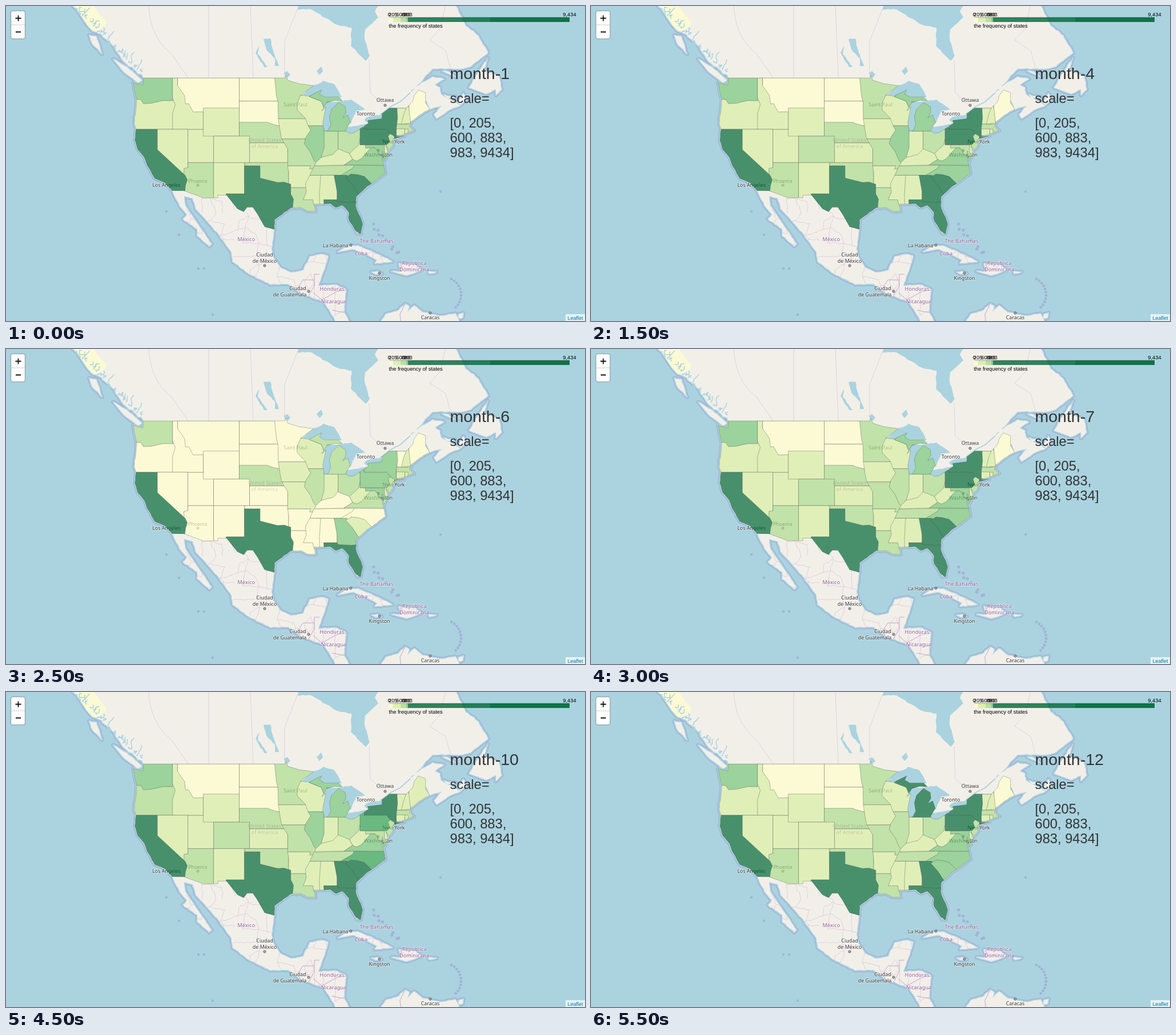
These frames come from a looping animation (1014 px wide and 552 px high, 6 s). An HTML page:

```html
<!DOCTYPE html>
<html lang="en">
<head>
<meta charset="utf-8">
<title>State frequency by month</title>
<style>
html, body { margin: 0; width: 100%; height: 100%; overflow: hidden; background: #aad3df; }
svg { display: block; width: 1014px; height: 552px; }
.city { font: 8.9px "Noto Sans", sans-serif; fill: #333; }
.country { font: 9px "Noto Sans", sans-serif; fill: #8f5a99; letter-spacing: .15px; }
.city, .country { text-anchor: middle; paint-order: stroke; stroke: #fff; stroke-opacity: .55; stroke-width: 1.6px; }
.small { font: 9.3px "Liberation Sans", Arial, sans-serif; }
.big { font: 23.7px "Liberation Sans", Arial, sans-serif; fill: #333; }
#month { font-size: 28.5px; }
</style>
</head>
<body>
<svg id="stage" viewBox="0 0 1014 552" xmlns="http://www.w3.org/2000/svg"></svg>
<script>
const sea = "#aad3df", ground = "#f2efe9", shelf = "#a4b2d7";
const ramp = ["#ffffcc", "#d9f0a3", "#addd8e", "#78c679", "#31a354", "#006837"];

// States as degrees west and north; four numbers make a box. Later states
// cover earlier ones, so each border is written once; the coast clips the rest.
const states = {
  WA: "125.5 49.5 117.03 45.5",
  OR: "125 46.25 123.2 46.15 122.7 45.6 121.2 45.65 119 46 116.4 46 116.4 42 125 42",
  MT: "116.05 49 104.05 44.4",
  UT: "114.04 42 109.05 37",
  WY: "111.05 45 104.05 41",
  ID: "117.03 49 116.05 49 116.05 48 114.7 46.7 114.5 45.56 113.9 45.6 113 44.45 111.05 44.48 111.05 42 117.03 42 117.03 44.2 116.5 45.5 117.03 46.4",
  NV: "120 42 114.04 35",
  NM: "109.05 37 103 31.3",
  AZ: "114.04 37 109.05 37 109.05 31 114.8 31 114.8 36.1 114.04 36.2",
  CA: "125 42 120 42 120 39 114.6 35 114.15 34.27 114.5 33.4 114.7 32 125 32",
  ND: "104.05 49 96 45.94",
  SD: "104.05 45.94 96 42.5",
  NE: "104.05 43 98.5 43 97.9 42.8 96.4 42.5 95 42.5 95 40 104.05 40",
  CO: "109.05 41 102.05 37",
  KS: "102.05 40 94.61 37",
  OK: "103 37 94.43 33.6",
  MN: "97.23 49.5 89 49.5 89 43.5 96.45 43.5 96.5 45.9 96.8 46.6",
  IA: "96.45 43.5 90 43.5 90 40.6 95.8 40.58 96.1 41.8",
  AR: "94.62 36.5 89 36.5 89 33 94.04 33 94.04 33.6 94.45 33.6 94.43 35.4",
  LA: "94.04 33 88.8 28",
  MO: "95.77 40.58 89 40.58 89 36 90.37 36 90.15 36.5 94.62 36.5 94.61 39.1",
  TX: "103.04 36.5 100 36.5 100 34.56 96.6 33.85 95.3 33.9 94.04 33.55 94.04 32 93.5 31.1 93.75 29 96 25 106.6 28 106.6 32 103.04 32",
  MS: "91.1 33 91 32.3 91.6 31 89.75 31 89.5 30 88 30 88 35 90.3 35 91.15 33.7",
  AL: "88.2 35 85 35 85 31 87.6 31 87.5 30 88.4 30 88.45 31.9",
  WI: "92.1 46.7 90.8 47 90.4 46.55 88.1 45.92 87.6 45.1 86.9 45.2 87.5 42.5 90.65 42.5 91.2 43.6 92.75 44.75 92.85 45.6",
  IN: "88.1 41.75 84.81 37.7",
  IL: "90.65 42.5 87.53 42.5 87.53 39.3 88.1 37.8 89 36.9 89.5 37.3 90.2 38.6 91.4 39.9 91.1 40.8 90.15 41.9",
  VA: "83.7 36.58 75 36.55 75 39.4 78.5 39.4 80.3 38 82 37.5",
  OH: "84.82 42 80.52 38.3",
  WV: "82.6 38.4 82 37.5 81.2 37.25 80.3 37.6 78.3 39.4 77.75 39.3 77.75 39.72 80.52 39.72 80.52 40.6 80.8 39.7",
  TN: "90.3 35 81.68 35 81.68 36.6 89.5 36.5",
  NC: "84.3 35 78.5 33 75 34 75 36.55 81.68 36.59 82 36.1",
  GA: "85.6 35 83.1 35 80 32 80 30.3 85 30.5 85 32.3",
  SC: "83.35 34.7 82.3 35.2 81 35.1 79.7 34.8 78 33.4 80 31.5 80.9 32.05 82 33.45",
  FL: "87.6 31 85 31 84.86 30.7 82.2 30.57 81 30.7 79 24 87.5 30",
  KY: "89.4 36.5 83.7 36.6 82 37.5 82.6 38.4 84.8 39.1 85.8 38.25 88.1 37.8 89.15 36.98",
  ME: "71.05 47.5 66.9 43",
  VT: "73.4 45 71.5 42.74",
  MA: "73.5 42.74 69.5 41",
  CT: "73.5 42.05 71.83 41",
  RI: "71.83 42.02 71.2 41",
  NH: "71.5 45.1 71.08 45.3 70.7 42.87 72.5 42.73 72.05 44.1",
  NY: "79.76 42 79.76 43.5 74.7 45.1 73.35 45 73.25 43.6 73.5 42.05 73.5 41.05 71.7 41.1 71.7 40.8 74 40.4 74.7 41.35",
  MD: "79.48 39.72 75 39.72 75 38 76.3 38 77 38.35 77.05 38.85 77.75 39.3 79.48 39.2",
  PA: "80.52 42.3 79.76 42.3 79.76 42 75.35 42 74.6 41.3 74.7 39.72 80.52 39.72",
  DE: "75.79 39.72 75 38.45",
  NJ: "74.7 41.35 73.9 41 73.5 40 74.9 38.5 75.5 39.6 74.75 40.2 75.1 40.95",
  MI: "87 45.85 82 41.72/90.4 46.55 88 48 83.5 46.4 84 45.9 87 45.5 87.6 45.1 88.1 45.92"
};

const north = "122.8 48.1 122.75 49 95.15 49 95 49.35 94.6 48.7 92.4 48.25 89.6 48 92.1 46.75 90.5 46.6 88 47.45 88.4 46.9 87.4 46.5 84.7 46.5 84 46 85.5 46.05 87 45.75 88 44.6 87.2 45.1 87.8 43 87.5 41.7 86.8 41.8 86.25 42.6 86.5 43.8 86.1 44.8 84.75 45.77 83.4 45.2 83.3 44.4 83.9 43.65 82.95 44.05 82.45 43 83.4 41.8 82.6 41.4 81.7 41.5 78.9 42.85 79.05 43.27 76.3 43.5 76.3 44.2 74.8 45 71.5 45 70.3 45.9 70 46.7 69.2 47.45 67.8 47.07 67.8 45.7";
const atlantic = "67 44.85 69 44 70.6 43.1 70.9 42.4 70 41.8 71.2 41.5 73.7 40.9 74.2 40.5 74.1 39.7 74.9 38.95 75.5 39.5 75.05 38.45 75.9 37.2 76.2 38.8 76.4 38 76 36.9 75.6 35.3 77.9 33.9 79.2 33.2 81.3 31.5 81.4 30 80.05 26.9 80.4 25.2";
const gulf = "81.1 25.2 82.7 27.6 82.7 28.9 84 30.1 85.3 29.7 86.3 30.4 89.4 30.3 89.2 29.05 90.8 29.1 91.8 29.6 93.85 29.7 95.3 28.9 97.2 27.6 97.2 25.95";
const south = "99.1 26.4 100.5 28.6 101.4 29.77 102.5 29.75 103.2 29 104.4 29.5 106.5 31.78 108.2 31.78 108.2 31.33 111.07 31.33 114.8 32.5";
const pacific = "117.12 32.53 118.4 33.75 120.5 34.5 121.9 36.5 122.5 37.8 123.8 39 124.35 40.4 124.1 42 124.5 42.8 124 46.2 124.7 48.4";

// Other land and water, in stage pixels.
const panhandle = "118 -8 128 12 142 33 150 42 161 44 173 35 176 28 161 11 150 -8";
const fjordCoast = "110 -10 128 12 152 44 168 50 190 72 206 97 238 120";
const canada = "241 127 262 200 600 228 680 200 736 166 742 181 764 175 750 190 754 197 773 184 796 174 762 155 760 143 751 138 767 128 747 124 724 138 708 152 720 139 747 110 796 110 814 106 844 82 827 52 805 35 788 0 788 -10";
const mexico = "291 323 304 350 317 365 310 373 335 391 335 403 356 421 360 417 342 391 314 350 312 333 327 337 332 355 373 401 395 432 397 448 425 469 463 488 494 487 515 503 557 519 574 545 580 560 606 560 592 537 596 498 580 489 547 490 556 465 564 438 553 435 532 439 521 463 499 467 480 458 468 440 465 425 470 391 440 340 312 318";
const cuba = "581 431 598 421 616 420 652 435 677 448 646 451 650 445 640 440 620 430 607 426";
const hispaniola = "675 465 693 465 688 451 716 453 729 463 701 472";
const islands = [cuba, hispaniola,
  "188 93 212 107 238 130 231 134 205 114",
  "146 51 158 53 168 84 150 64",
  "811 143 820 126 844 91 836 112 863 123 868 146 858 156 858 146 841 154",
  "791 170 801 153 806 165 797 173",
  "767 155 774 158 787 159 772 162",
  "764 114 775 115 789 125",
  "640 466 650 465 658 469 648 470",
  "740 465 754 466 741 469",
  "793 540 801 538 800 546 792 547",
  "650 562 665 540 688 533 699 522 706 526 703 536 715 525 730 537 764 543 787 539 798 562"];
const water = [
  "514 -9 510 6 535 6 580 33 605 38 604 70 630 96 637 87 628 58 629 41 652 20 646 10 656 -9",
  "516 157 535 142 556 131 575 137 588 160",
  "553 168 582 168 582 222 553 222",
  "580 168 605 164 629 181 613 184 604 206 585 206",
  "590 224 598 212 638 205 638 222",
  "627 200 632 195 657 190 660 203 632 204",
  "451 58 463 57 469 82 478 105 471 105 471 92 456 76",
  "443 70 441 84 458 107 452 107 437 82",
  "544 114 552 106 555 114 549 121",
  "486 117 492 114 498 120 493 126"];

let seed = 7;
function random() {
  seed = (seed * 16807) % 2147483647;
  return seed / 2147483647;
}
const jitter = size => (random() - .5) * 2 * size;

function pairs(text) {
  const n = text.split(" ").map(Number);
  return n.flatMap((v, i) => i % 2 ? [] : [[v, n[i + 1]]]);
}
function project([west, lat]) {
  const merc = Math.log(Math.tan(Math.PI / 4 + lat * Math.PI / 360));
  return [1344.9 - 9 * west, 633.3 - 515.7 * merc];
}
const geo = text => pairs(text).map(project);
// Breaks a line into short steps and shakes the points between its keys.
function rough(points, size) {
  return points.flatMap((p, i) => {
    const q = points[i + 1];
    if (!q) return [p];
    const n = Math.ceil(Math.hypot(q[0] - p[0], q[1] - p[1]) / 6);
    return Array.from({ length: n }, (_, k) => [0, 1].map(a =>
      p[a] + (q[a] - p[a]) * k / n + (k ? jitter(size) : 0)));
  });
}
const line = points => "M" + points.map(p => p.map(v => v.toFixed(1)).join(" ")).join("L");
const ring = points => line(points) + "z";
function stateShape(text) {
  return text.split("/").map(part => {
    const p = pairs(part), [a, b] = p;
    return ring((p.length === 2 ? [a, [b[0], a[1]], b, [a[0], b[1]]] : p).map(project));
  }).join("");
}

const path = (d, attrs = "") => `<path d="${d}" ${attrs}/>`;
const group = (attrs, body) => `<g ${attrs}>${body}</g>`;
const rect = (x, y, w, h, attrs) => `<rect x="${x}" y="${y}" width="${w}" height="${h}" ${attrs}/>`;
const dot = (x, y, r) => `<circle cx="${x}" cy="${y}" r="${r}"/>`;
const text = (x, y, s, attrs) => `<text x="${x}" y="${y}" ${attrs}>${s}</text>`;
const labels = (cls, list) => list.map(([x, y, s]) => text(x, y, s, `class="${cls}"`)).join("");

const longIsland = ring(geo("74 40.6 73.7 40.88 72.5 40.97 71.9 41.05"));
const usa = ring([...geo(north), ...rough(geo(atlantic), .7), ...rough(geo(gulf), .7),
  ...geo(south), ...rough(geo(pacific), .7)]) + longIsland;
const mexicoShape = ring(rough(pairs(mexico), .8));
const coast = [ring([...rough(pairs(fjordCoast), 2.5), ...rough(pairs(canada), 1)]), mexicoShape,
  ring(pairs(panhandle)), ...islands.map(s => ring(rough(pairs(s), .8))), usa].join("");

function fjords() {
  let d = "";
  for (let i = 0; i < 30; i++) {
    const t = i / 29, p = [[122 + 112 * t + jitter(3), 118 * t ** .9 - 2]];
    for (let k = 0; k < 4; k++) p.push([p[k][0] + 1 + jitter(4), p[k][1] - 2 + jitter(5)]);
    d += line(p);
  }
  return d;
}
// A loose net of province lines, cut to the land it lies on.
function net() {
  const step = 20, at = {};
  let d = "";
  for (let y = 335; y < 545; y += step) for (let x = 320; x < 740; x += step) {
    const p = at[x + "," + y] = [x + jitter(8), y + jitter(8)];
    for (const q of [at[x - step + "," + y], at[x + "," + (y - step)]])
      if (q && random() < .6) d += line(rough([q, p], 1.5));
  }
  return d;
}
function islets() {
  let out = [[761, 325], [281, 360], [303, 401], [347, 460], [337, 460], [362, 541]].map(p => dot(...p, 2.2)).join("");
  for (let i = 0; i < 11; i++) {
    const a = -1.1 + i * .19;
    out += dot(766 + 31 * Math.cos(a), 506 + 31 * Math.sin(a), 2.4);
    out += dot(640 + 4.8 * i + jitter(5), 384 + 5 * i + jitter(3), 2.6);
  }
  return out;
}

const provinces = "M250-2Q252 55 290 84L319 126M355-2V126M428-2L433 126M510 6L488 62V124M636 95L638 152 666 178M770-2L760 40 742 60 770 78 778 108";
const nations = "M515 503L512 492 520 480 540 480V470H549M540 480V490L530 508M538 502L553 515 580 500 596 498M571 533L592 537M692 465V451M699 522L690 540 692 560";
const townDots = [[664, 174], [453, 455], [530, 500], [604, 419], [654, 468], [743, 538], [652, 253], [336, 314]];
const cities = [[664, 168, "Ottawa"], [630, 192, "Toronto"], [507, 176, "Saint Paul"], [679, 241, "New York"],
  [652, 264, "Washington"], [281, 317, "Los Angeles"], [336, 310, "Phoenix"], [453, 439, "Ciudad"], [453, 450, "de México"],
  [511, 498, "Ciudad"], [497, 508.5, "de Guatemala"], [577, 422.5, "La Habana"], [654, 480, "Kingston"], [743, 549, "Caracas"]];
const countries = [[453, 238, "United States"], [453, 248.5, "of America"], [421, 411.5, "México"], [649, 415, "The Bahamas"],
  [622, 437, "Cuba"], [715, 454, "República"], [715, 464.5, "Dominicana"], [571, 499, "Honduras"], [574, 520.5, "Nicaragua"]];

const legendX = v => 671 + v * 316 / 9434;
const stops = [0, 205, 600, 883, 983, 9434];
const legend = stops.slice(1).map((v, i) => {
  const x = legendX(stops[i]);
  return rect(x, 20, legendX(v) - x, 8, `fill="${ramp[i < 4 ? i : 5]}" fill-opacity=".8"`);
}).join("") + rect(848, 20, 139, 8, 'fill="#006837" fill-opacity=".5"')
  + path("M671 20H987", 'stroke="#234" stroke-opacity=".45"')
  + stops.map(v => text(legendX(v), 18, v.toLocaleString("en-US"), 'class="small" text-anchor="middle"')).join("")
  + text(670.5, 37.5, "the frequency of states", 'class="small"');

const zoom = rect(8.5, 8.5, 25, 49, 'rx="3.5" fill="#fff" stroke="#000" stroke-opacity=".25" stroke-width="1.6"')
  + path("M9 33H33", 'stroke="#ccc"') + path("M16.5 21.5H26.5M21.5 16.5V26.5M17 45.5H26", 'stroke="#111" stroke-width="1.8"');

const stage = document.getElementById("stage");
stage.innerHTML = `<defs><clipPath id="us">${path(usa)}</clipPath><clipPath id="latin">`
  + path(mexicoShape + ring(pairs(cuba)) + ring(pairs(hispaniola))) + "</clipPath></defs>"
  + rect(0, 0, 1014, 552, `fill="${sea}"`)
  + path(coast, `fill="none" stroke="${shelf}" stroke-width="7" stroke-linejoin="round"`)
  + path(coast, `fill="none" stroke="${sea}" stroke-width="3.8" stroke-linejoin="round"`)
  + group(`fill="${shelf}"`, islets())
  + path(coast, `fill="${ground}"`)
  + path(water.map(s => ring(rough(pairs(s), .8))).join(""), `fill="${sea}"`)
  + path("M708 152L690 168 674 176 656 190", `fill="none" stroke="${sea}" stroke-width="1.8"`)
  + path(usa, `fill="${ground}"`)
  + path(net(), 'clip-path="url(#latin)" fill="none" stroke="#dcc6dc" stroke-width=".8"')
  + path(provinces, 'fill="none" stroke="#dccbdd" stroke-width=".8"')
  + path(nations, 'fill="none" stroke="#c5a3cd"')
  + group('fill="#aaa" stroke="#555" stroke-width=".9"', townDots.map(p => dot(...p, 2.1)).join(""))
  + labels("city", cities) + labels("country", countries)
  + group('clip-path="url(#us)" opacity=".7" stroke="#000" stroke-opacity=".42" stroke-width=".9" stroke-linejoin="round"',
    Object.entries(states).map(([id, s]) => path(stateShape(s), `id="${id}"`)).join(""))
  + path(usa, 'fill="none" stroke="#000" stroke-opacity=".27" stroke-width=".8"')
  + path(ring(pairs(panhandle)), `fill="${ramp[0]}" fill-opacity=".7"`)
  + path(fjords(), `fill="none" stroke="${sea}" stroke-width="1.5"`)
  + legend
  + text(777.5, 128.3, "", 'id="month" class="big"')
  + ["scale=", "[0, 205,", "600, 883,", "983, 9434]"]
    .map((s, i) => text(777.5, i ? 186.4 + 26.1 * i : 170.4, s, 'class="big"')).join("")
  + zoom + rect(980, 540, 34, 12, 'fill="#fff" fill-opacity=".7"')
  + text(983.5, 549.5, "Leaflet", 'class="small" style="font-size:9px" fill="#0078a8"');

// States listed by level 0 to 5, then what each month changes.
const levels = ["MT ND SD ME", "OR NV ID WY UT NM KS IA AR MS AL KY WV DE CT RI VT NH WI IN",
  "CO AZ NE OK MN MO LA TN NJ MA OH", "WA NC VA MD MI IL", "", "CA TX GA FL SC PA NY"];
const changes = ["CO1 IN2", "CO1", "ME1 MD4 NJ3", "MD2", "NY4 PA2 GA4 NC4 IL2 MD2",
  "WA2 CA5 TX5 FL5 GA3 SC1 NY3 PA3 NJ2 MA2 VA2 MD3 WV1 OH2 IN1 MI2 WI1 IL2 MO1 IA1 NE2 NH1 CT1 RI1 DE1",
  "IL2", "OR2 ND1 IL2 IN2 VA5 NC5 MD5", "OR2 NC4", "OR2 PA4 NC4 ME1 MD2", "PA4", "CO1 MI5 SC3 IL2"];
const quietMonth = 5;

function levelOf(id, m) {
  const change = changes[m].split(" ").find(c => c.startsWith(id));
  if (change) return +change[2];
  return m === quietMonth ? 0 : levels.findIndex(s => s.includes(id));
}

const title = document.getElementById("month");
let shown = -1;
function draw(ms) {
  const m = Math.floor(ms / 500) % 12;
  if (m === shown) return;
  shown = m;
  title.textContent = "month-" + (m + 1);
  for (const id in states) document.getElementById(id).setAttribute("fill", ramp[levelOf(id, m)]);
}
function loop() {
  draw(performance.now());
  requestAnimationFrame(loop);
}
loop();
</script>
</body>
</html>
```
